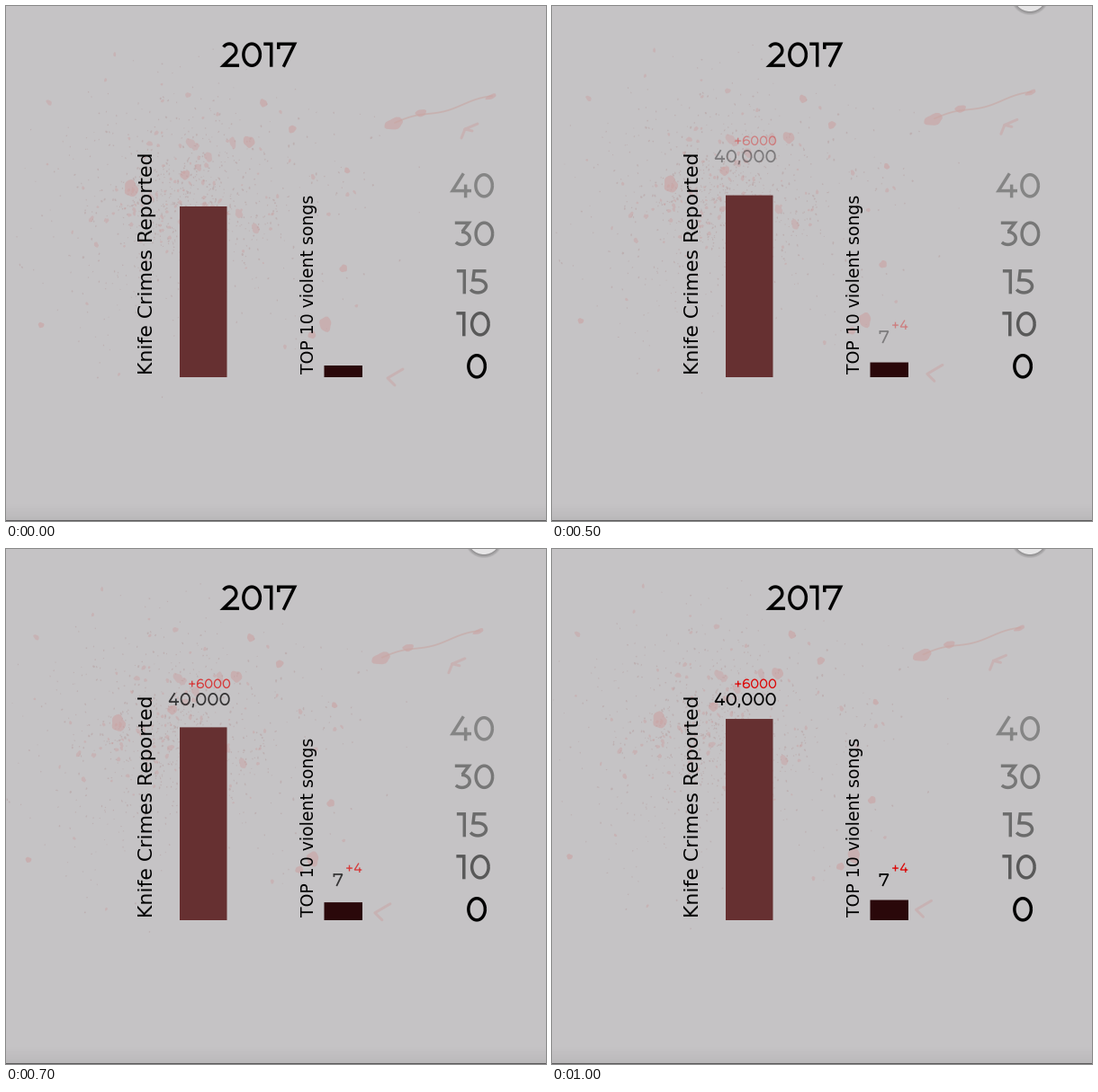
Write a matplotlib script that moves like this. It is 600 px wide and 573 px high and loops after 2700 ms.

```python
import numpy as np
import matplotlib.pyplot as plt
from matplotlib.animation import FuncAnimation
from matplotlib.patches import Circle, PathPatch, Rectangle
from matplotlib.path import Path
from matplotlib.transforms import Affine2D

W, H, DPI = 600, 573, 100
PX = 72 / DPI
BG = "#c5c3c5"
STAIN = "#cb9f9f"

fig = plt.figure(figsize=(W / DPI, H / DPI), dpi=DPI, facecolor=BG)
ax = fig.add_axes([0, 0, 1, 1])
ax.set(xlim=(0, W), ylim=(H, 0))
ax.axis("off")


def arc(cx, cy, rx, ry, start=0, end=360):
    a = np.radians(np.linspace(start, end, 40))
    return np.column_stack([cx + rx * np.cos(a), cy + ry * np.sin(a)])


def stroke(*parts):
    return Path(np.vstack(parts))


# Geometric numerals: em-unit advance, then strokes built from lines and arcs.
TOP, FOOT = .66, .04
GLYPHS = {
    "0": (.663, stroke(arc(.332, .35, .24, .313))),
    "1": (.365, stroke([(.01, TOP), (.228, TOP), (.228, 0)])),
    "2": (.573, stroke(arc(.26, .475, .195, .19, 150, -42), [(.09, FOOT), (.54, FOOT)])),
    "3": (.571, stroke([(.06, TOP), (.46, TOP), (.265, .4)],
                       arc(.26, .218, .225, .182, 90, -140))),
    "4": (.669, stroke([(.41, .7), (.095, .2), (.635, .2)]), stroke([(.47, .38), (.47, 0)])),
    "5": (.574, stroke([(.49, TOP), (.145, TOP), (.115, .4)],
                       arc(.25, .218, .24, .182, 90, -150))),
    "6": (.616, stroke(arc(.33, .22, .23, .183)), stroke(arc(.36, .33, .26, .333, 55, 190))),
    "7": (.599, stroke([(.072, .51), (.072, TOP), (.535, TOP), (.215, 0)])),
    "+": (.58, stroke([(.06, .33), (.52, .33)]), stroke([(.29, .1), (.29, .56)])),
    ",": (.22, stroke([(.115, .1), (.115, .02), (.075, -.12)])),
}


def numeral(text, x, y, em, color="black"):
    parts = []
    for ch in text:
        advance, *strokes = GLYPHS[ch]
        place = Affine2D().scale(em, -em).translate(x, y)
        parts += [s.transformed(place) for s in strokes]
        x += advance * em
    return ax.add_patch(PathPatch(
        Path.make_compound_path(*parts), fc="none", ec=color, lw=.09 * em * PX,
        capstyle="butt", joinstyle="miter", zorder=5))


def label(text, x, y, px):
    ax.text(x, y, text, family="DejaVu Sans", fontsize=px * PX, rotation=90,
            rotation_mode="anchor", ha="left", va="baseline", zorder=5)


# Blood splatter, all carried by one transform
rng = np.random.default_rng(17)
drift = Affine2D()


def blob(x, y, rx, ry, angle=0, rough=.2):
    a = np.linspace(0, 2 * np.pi, 21)
    r = 1 + rough * sum(np.sin(k * a + rng.uniform(0, 6)) / k ** .5 for k in (2, 3, 5)) / 1.5
    pts = np.column_stack([rx * r * np.cos(a), ry * r * np.sin(a)])
    return Path(pts, closed=True).transformed(
        Affine2D().rotate_deg(angle).translate(x, y))


def stain(paths, color, alpha, width=0):
    fill = {"fc": "none", "ec": color} if width else {"fc": color, "ec": "none"}
    ax.add_patch(PathPatch(Path.make_compound_path(*paths), alpha=alpha, lw=width * PX,
                           capstyle="round", joinstyle="round", zorder=1,
                           transform=drift + ax.transData, **fill))


fine, coarse = [], []
while len(fine) + len(coarse) < 1000:
    spread = rng.uniform(25, 115)
    x, y = rng.normal(205, spread), rng.normal(220, .85 * spread)
    if 4 < x < 470 and 48 < y < 462:
        r = min(.5 * (1 + rng.pareto(2.5)), 4.2)
        spot = blob(x, y, r, r * rng.uniform(.7, 1.8), rng.uniform(-40, 40))
        (fine if r < 1.1 else coarse).append(spot)
stain(fine, "#b69e9f", .5)
stain(coarse, STAIN, .42)

drops = [(139, 203, 8), (270, 151, 6), (286, 108, 4), (318, 137, 4), (199, 188, 5),
         (379, 183, 3), (375, 292, 4), (355, 354, 7), (340, 366, 4), (39, 355, 3)]
stain([blob(x, y, r, 1.1 * r) for x, y, r in drops], STAIN, .55)

# Long streak with a heavy head, and two short smears
u = np.linspace(0, 1, 40)
streak = np.column_stack([432 + 108 * u, 130 - 29 * u - 2 * np.sin(9 * u)])
stain([blob(431, 131, 11, 6, -12), blob(461, 119, 6, 4), blob(539, 101, 6, 2.6, -20)],
      STAIN, .55)
stain([stroke(streak)], "#c8a6a2", .6, 1.8)
stain([stroke([(524, 131), (510, 137), (506, 147)]), stroke([(510, 137), (518, 139)]),
       stroke([(441, 404), (424, 414), (432, 422)])], STAIN, .45, 3)

# Floor shading
for y in range(552, 572):
    ax.add_patch(Rectangle((0, y), W, 1, fc="black", alpha=.055 * ((y - 551) / 20) ** 1.5,
                           lw=0, antialiased=False, zorder=2))
ax.add_patch(Rectangle((0, 572), W, 1, fc="#5c5b5c", lw=0, antialiased=False, zorder=2))

# Static labels
numeral("2017", 238.2, 67.7, 38.6)
for text, x, y, gray in [("40", 492.5, 213.3, .52), ("30", 496.5, 266.8, .465),
                         ("15", 500.5, 320.3, .42), ("10", 500, 367.3, .35),
                         ("0", 510.3, 414.3, 0)]:
    numeral(text, x, y, 38.6, str(gray))
label("Knife Crimes Reported", 162.7, 409.5, 22)
label("TOP 10 violent songs", 341.7, 409, 18.9)

# Moving parts
BASE = 413
RED = "#dc0a0a"
crimes = ax.add_patch(Rectangle((193, BASE), 52.5, 0, fc="#663031", lw=0, zorder=4, snap=False))
songs = ax.add_patch(Rectangle((353.5, BASE), 42.5, 0, fc="#2a080a", lw=0, zorder=4, snap=False))
counts = [numeral("40,000", 179.5, 174, 19.8), numeral("7", 363, 375, 19.8),
          numeral("+6000", 202.4, 155, 14.9, RED), numeral("+4", 377.2, 360, 14.9, RED)]
knob = [Circle((531, -11.5), 18.5 + d, fc="black", alpha=.07, lw=0, zorder=6)
        for d in range(4)]
knob.append(Circle((531, -12.5), 18.5, fc="#e6e5e6", lw=0, zorder=7))
for c in knob:
    ax.add_patch(c)


def ease(t):
    u = np.clip((min(t, 1000) - 270) / 755, 0, 1)
    return np.sin(np.pi / 2 * u) ** 1.3


def update(i):
    t = i * 100
    p = ease(t)
    drift.clear().translate(-19.5 * p, -12.7 * p)
    for bar, start, end in ((crimes, 190, 224), (songs, 13, 22.5)):
        bar.set_height(-(start + (end - start) * p))
    for c in counts:
        c.set_alpha(p)
    for c in knob:
        c.set_visible(t >= 300)
    return [crimes, songs, *counts, *knob]


anim = FuncAnimation(fig, update, frames=27, interval=100, repeat=True,
                     repeat_delay=0, blit=False)
plt.show()
```
